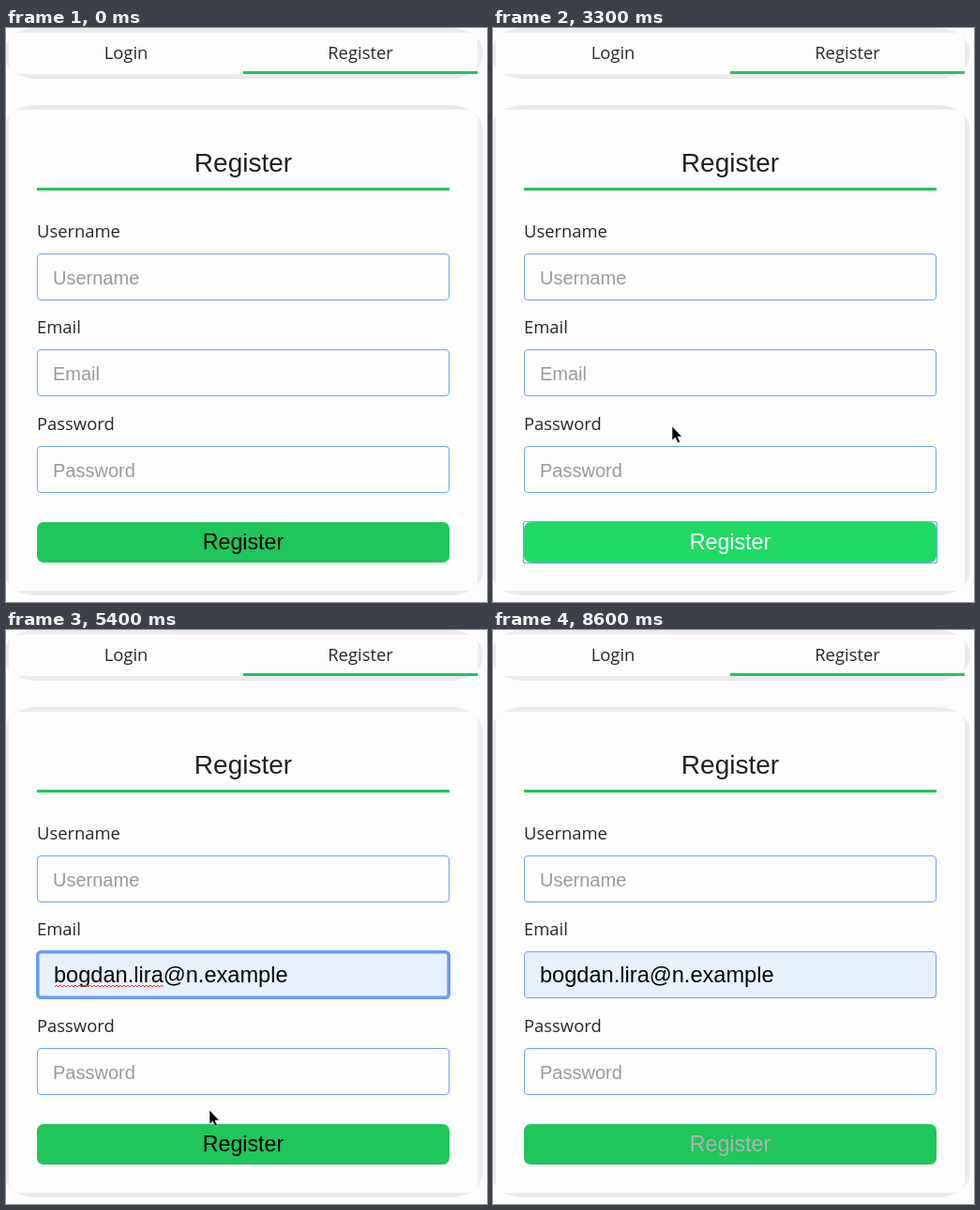
Animation, 513 px wide and 611 px high, one loop 8700 ms. Source, as an HTML page:

```html
<!DOCTYPE html>
<html lang="en">
<head>
<meta charset="utf-8">
<title>Register form</title>
<style>
html, body { margin: 0; width: 100%; height: 100%; overflow: hidden; background: #fdfdfd; }
svg { display: block; width: 100%; height: 100%; cursor: default; }
text { font-family: "Liberation Sans", Arial, sans-serif; white-space: pre; }
.label { font: 18.4px "Open Sans", sans-serif; fill: #24282c; }
.hint { font-size: 20px; fill: #9b9999; }
.value { font-size: 23.6px; fill: #050505; }
.item { font: 600 15px "Open Sans", sans-serif; letter-spacing: .5px; fill: #222427; }
.mid { text-anchor: middle; }
.menu { filter: drop-shadow(0 2px 2px rgba(0, 0, 0, .3)); }
</style>
</head>
<body>
<svg id="stage" viewBox="0 0 513 611"></svg>
<script>
const LOOP = 8700, STEP = 100;
const GREEN = '#1fc65a', BRIGHT = '#1fda63', BLUE = '#6fa3f7', FILLED = '#e7f0fd';
const EMAIL = 'bogdan.lira@n.example';
const ITEMS = [EMAIL, '+375005550141', '+375005550168'];
const FIELDS = [['Username', 240], ['Email', 342], ['Password', 445]];

// Pointer path: time, x, y
const PATH = [
  [400, 25, 28], [800, 88, 235], [1200, 160, 362], [1300, 174, 376],
  [1700, 226, 528], [2000, 240, 541], [2600, 240, 541], [2700, 240, 540],
  [2900, 240, 540], [3200, 204, 450], [3500, 165, 372], [3900, 165, 373],
  [4100, 167, 400], [4400, 169, 421], [4800, 169, 421], [4900, 174, 440],
  [5000, 184, 464], [5100, 184, 464], [5500, 228, 526], [5900, 242, 539],
  [6900, 242, 539], [7100, 230, 494], [7400, 160, 330], [7600, 129, 252],
  [7800, 128, 28], [8000, 130, 18], [8100, 130, 18], [8300, 127, 3], [8400, 126, -30]
];

const $ = id => document.getElementById(id);
const set = (id, attrs) => {
  for (const key in attrs) $(id).setAttribute(key, attrs[key]);
};
const show = (id, on) => set(id, { visibility: on ? 'visible' : 'hidden' });
const within = (t, a, b) => t >= a && t < b;
const ramp = (t, a, b) => Math.min(1, Math.max(0, (t - a) / (b - a)));
const rect = (x, y, w, h, extra = '') =>
  `<rect x="${x}" y="${y}" width="${w}" height="${h}" ${extra}/>`;
const text = (x, y, cls, str, extra = '') =>
  `<text x="${x}" y="${y}" class="${cls}" ${extra}>${str}</text>`;

const panel = (y, h) =>
  rect(-2, y, 510.5, h, 'rx="34" ry="25" fill="#ebebeb"') +
  rect(3, y + 5, 500, h - 10, 'rx="10" fill="#fdfdfd"');

const field = ([name, y], i) =>
  text(33, y - 17, 'label', name) +
  rect(0, 0, 0, 0, `id="box${i}" rx="3.5"`) +
  text(50, y + 33, 'hint', name, `id="hint${i}"`);

function squiggle(x, y, width) {
  let d = `M${x} ${y}`;
  for (let i = 1; i * 2 <= width; i++) d += `L${x + i * 2} ${y + (i % 2 ? -2 : 0)}`;
  return d;
}

function build() {
  $('stage').innerHTML =
    rect(0, 0, 513, 611, 'fill="#fdfdfd"') +
    panel(0, 54) +
    text(128, 33, 'label mid', 'Login') + text(378, 33, 'label mid', 'Register') +
    rect(253, 46, 250, 3, `fill="${GREEN}"`) +
    panel(82, 522) +
    text(253, 153, 'mid', 'Register', 'font-size="28" fill="#212121"') +
    rect(33, 170, 440, 3, `fill="${GREEN}"`) +
    FIELDS.map(field).join('') +
    text(50, 375, 'value', EMAIL, 'id="value"') +
    '<path id="wave" fill="none" stroke="#e33" stroke-width="1"/>' +
    rect(0, 354, 1.2, 26, 'id="caret" fill="#111"') +
    rect(33, 526, 440, 43, 'id="button" rx="7"') +
    rect(32.5, 525.5, 441, 44, `id="ring" rx="2" fill="none" stroke="${BLUE}" stroke-width="1.2"`) +
    text(253, 555, 'mid', 'Register', 'id="caption" font-size="23.2"') +
    '<g id="menu"><path class="menu" fill="#fdfdfd" stroke="#d4d4d4" stroke-width=".6" ' +
    'd="M33 394H473V543Q473 547 469 547H37Q33 547 33 543Z"/>' +
    rect(33, 403, 440, 45, 'id="row" fill="#ebebec"') +
    ITEMS.map((s, i) => text(48.5, 431 + i * 45, 'item', s)).join('') + '</g>' +
    '<g id="pointer">' +
    '<path id="arrow" d="M0 0V15L3.5 12L6 17.5L8.5 16.5L6 11H10.5Z" fill="#000" stroke="#fff" stroke-width=".6"/>' +
    '<path id="beam" d="M-3.5-7.5H-1Q0-7.5 0-6.5Q0-7.5 1-7.5H3.5M0-6.5V6.5M-3.5 7.5H-1Q0 7.5 0 6.5Q0 7.5 1 7.5H3.5" fill="none" stroke="#111" stroke-width="1.1"/>' +
    '<g id="hand" stroke="#000" stroke-width="1.1" stroke-linejoin="round">' +
    '<path d="M-2 1.5Q0-1.5 2 1.5V8Q4 6.5 6 8.5Q8 7.5 9 10Q11 9.5 11 12V16L9 20V23H-1V20L-6 13Q-7 10-4 10.5L-2 13Z" fill="#fff"/>' +
    '<path d="M2 8V12M6 8.5V12.5M9 10V13" fill="none"/></g></g>';
  const length = $('value').getComputedTextLength();
  const name = $('value').getSubStringLength(0, EMAIL.indexOf('@'));
  set('wave', { d: squiggle(52, 380, name) });
  return 51 + length;
}

function pointerAt(t) {
  const i = PATH.findIndex(p => p[0] > t);
  if (i < 1) return null;
  const [t0, x0, y0] = PATH[i - 1], [t1, x1, y1] = PATH[i];
  const k = (t - t0) / (t1 - t0);
  return { x: Math.round(x0 + (x1 - x0) * k), y: Math.round(y0 + (y1 - y0) * k) };
}

function drawField(i, y, hover, focus, fill) {
  const w = focus ? 3.6 : hover ? 2 : 1;
  const out = focus ? 1 : 0;
  set('box' + i, {
    x: 33 - out + w / 2, y: y - out + w / 2,
    width: 440 + 2 * out - w, height: 50 + 2 * out - w,
    fill, stroke: focus ? '#669cf6' : BLUE, 'stroke-width': w
  });
  set('hint' + i, { x: hover || focus ? 51 : 50 });
}

function render(t) {
  const p = pointerAt(t);
  const menu = within(t, 3800, 4700);
  const preview = within(t, 4200, 4700);
  const filled = t >= 4200;
  const focus = within(t, 3700, 5900);
  const pressed = within(t, 2200, 3700) || within(t, 5900, 8530);
  const inX = p && p.x >= 33 && p.x < 473;
  const onMenu = menu && inX && p.y >= 394 && p.y < 547;
  const over = (y, h) => Boolean(inX && !onMenu && p.y >= y && p.y < y + h);
  const hovers = FIELDS.map(f => over(f[1], 50));
  const onButton = over(526, 43);

  FIELDS.forEach(([, y], i) => drawField(i, y, hovers[i], i === 1 && focus,
    i === 1 && filled ? FILLED : '#fdfdfd'));
  show('hint1', !filled);
  show('value', filled);
  set('value', { x: focus || hovers[1] ? 51 : 50 });
  show('wave', filled && !preview && focus);

  const blink = Math.floor((t - (t < 4700 ? 3600 : 4700)) / 500) % 2 === 0;
  show('caret', focus && !preview && (blink || within(t, 4100, 4200)));
  set('caret', { x: filled ? caretEnd : 52 });

  const white = t < 3700 ? ramp(t, 1600, 1900)
    : t < 5400 ? 1 - ramp(t, 3600, 3900)
    : ramp(t, 5500, 5800) - ramp(t, 8530, 8760);
  const c = Math.round(white * 255);
  set('button', { fill: onButton || pressed ? BRIGHT : GREEN });
  set('caption', { fill: `rgb(${c},${c},${c})` });
  show('ring', pressed);

  $('menu').style.display = menu ? '' : 'none';
  show('row', menu && preview);

  $('pointer').style.display = p ? '' : 'none';
  if (!p) return;
  set('pointer', { transform: `translate(${p.x} ${p.y})` });
  const beam = hovers.includes(true);
  const hand = onButton || within(p.y, 5, 49);
  show('beam', beam);
  show('hand', hand);
  show('arrow', !beam && !hand);
}

const caretEnd = build();
const start = performance.now();
function tick() {
  const t = (performance.now() - start) % LOOP;
  render(Math.floor(t / STEP) * STEP);
  requestAnimationFrame(tick);
}
tick();
</script>
</body>
</html>
```
